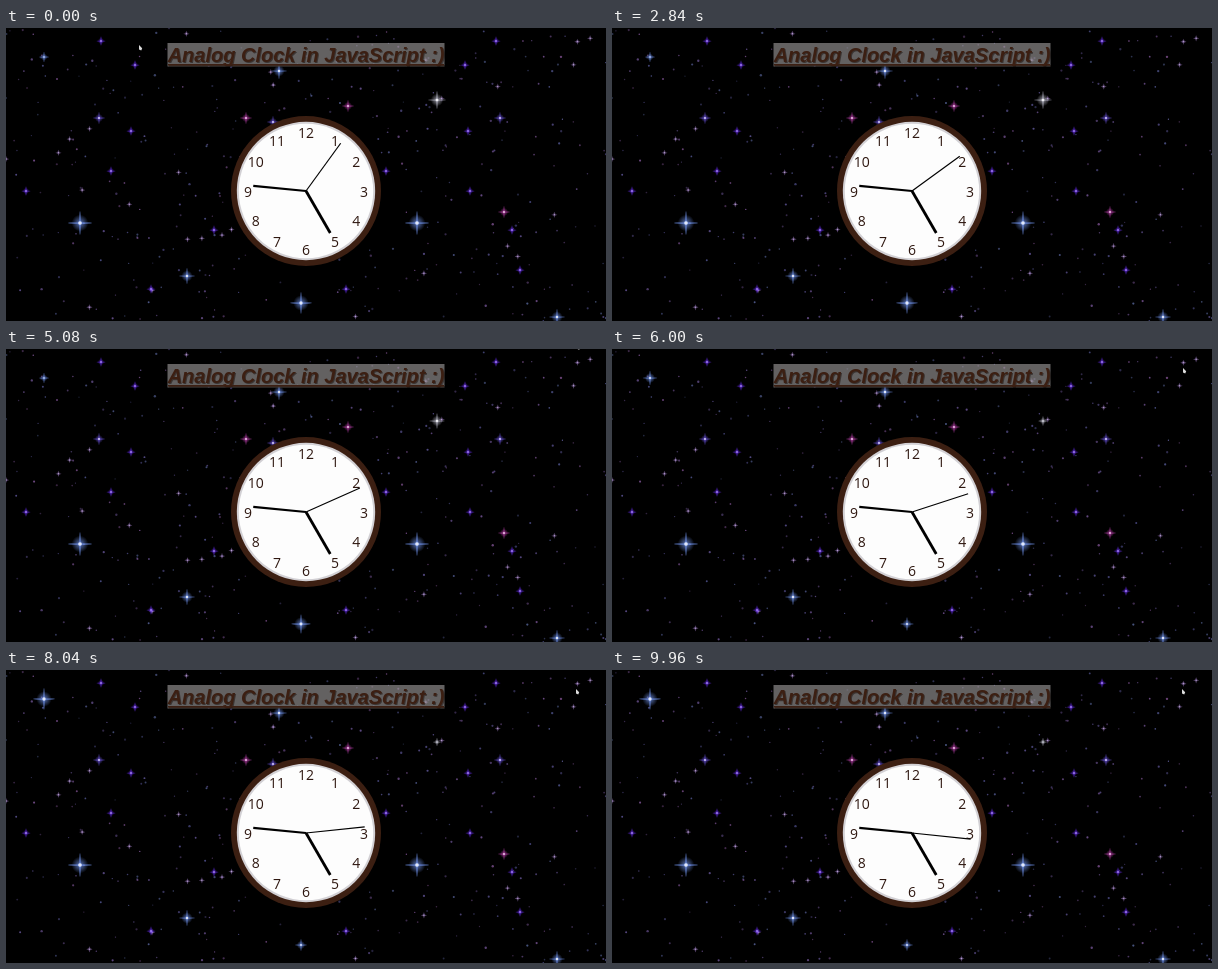
These frames come from a looping animation (600x293 px, 10 s). An HTML page with a canvas:

```html
<!DOCTYPE html>
<html lang="en">
<head>
<meta charset="utf-8">
<title>Analog Clock</title>
<style>
  html, body { margin: 0; height: 100%; overflow: hidden; background: #000; }
  canvas { display: block; }
</style>
</head>
<body>
<canvas width="600" height="293"></canvas>
<script>
const ctx = document.querySelector('canvas').getContext('2d');
const W = 600, H = 293, CX = 300, CY = 163, LOOP = 10000, TAU = Math.PI * 2;
const BROWN = '#3c1f12', BLUE = '115,150,240', VIOLET = '110,50,250', PINK = '190,65,175';

function dot(c, x, y, r, color) {
  c.fillStyle = color;
  c.beginPath();
  c.arc(x, y, r, 0, TAU);
  c.fill();
}

// A soft glow, four thin rays and a pale core
function star(c, x, y, r, rgb) {
  const glow = c.createRadialGradient(x, y, 0, x, y, r * .7);
  glow.addColorStop(0, `rgba(${rgb},1)`);
  glow.addColorStop(.35, `rgba(${rgb},.5)`);
  glow.addColorStop(1, `rgba(${rgb},0)`);
  dot(c, x, y, r * .7, glow);
  const ray = .4 + r * .05;
  c.fillStyle = `rgba(${rgb},.55)`;
  c.beginPath();
  c.ellipse(x, y, r, ray, 0, 0, TAU);
  c.ellipse(x, y, ray, r, 0, 0, TAU);
  c.fill();
  dot(c, x, y, r * .15, 'rgba(255,255,255,.8)');
}

function makeSky() {
  const sky = document.createElement('canvas');
  sky.width = W;
  sky.height = H;
  const c = sky.getContext('2d');
  let seed = 11;
  const rnd = () => (seed = seed * 16807 % 2147483647) / 2147483647;
  c.fillStyle = '#000';
  c.fillRect(0, 0, W, H);

  // Scattered dust, bluish to purple, with a small star now and then
  for (let i = 0; i < 420; i++) {
    const x = rnd() * W, y = rnd() * H, hue = 225 + rnd() * 60;
    dot(c, x, y, .6 + rnd() * .6, `hsla(${hue},28%,50%,${.35 + rnd() * .45})`);
    if (i % 16 === 0) star(c, x, y, 3, '135,105,165');
  }

  const scatter = (rgb, r, ...spots) => spots.forEach(([x, y]) => star(c, x, y, r, rgb));
  scatter(BLUE, 12, [74, 195], [411, 195]);
  scatter(BLUE, 8, [273, 43], [181, 248], [551, 289]);
  scatter('110,85,225', 6, [93, 90], [494, 90], [267, 94]);
  scatter(PINK, 6, [240, 90], [342, 78], [498, 184]);
  scatter(VIOLET, 4.5, [95, 13], [490, 13], [129, 37], [459, 37], [125, 103], [462, 103],
    [105, 143], [380, 143], [20, 163], [464, 163], [208, 202], [506, 202], [145, 261], [340, 261], [514, 242]);
  return sky;
}

const sky = makeSky();

function title() {
  ctx.fillStyle = 'rgba(150,147,147,.66)';
  ctx.fillRect(161.5, 15, 277, 23.5);
  ctx.font = 'italic bold 20px "Liberation Sans", Arial, sans-serif';
  ctx.textAlign = 'center';
  ctx.textBaseline = 'alphabetic';
  const write = (color, d) => {
    ctx.fillStyle = color;
    ctx.fillText('Analog Clock in JavaScript :)', CX + d, 34 + d);
    ctx.fillRect(162 + d, 36 + d, 276, 1.6);
  };
  write('rgba(20,10,5,.5)', 1);
  write(BROWN, 0);
}

function face() {
  dot(ctx, CX, CY, 75, BROWN);
  dot(ctx, CX, CY, 69.2, '#d2d0d4');
  dot(ctx, CX, CY, 67.2, '#fdfdfd');
  ctx.fillStyle = '#2e1710';
  ctx.font = '500 14px "Open Sans", sans-serif';
  ctx.textAlign = 'center';
  for (let n = 1; n <= 12; n++) {
    const a = n * TAU / 12;
    ctx.fillText(n, CX + 58 * Math.sin(a), CY + 5.6 - 58.5 * Math.cos(a));
  }
}

function hand(degrees, length, width) {
  const a = degrees * TAU / 360;
  ctx.strokeStyle = '#000';
  ctx.lineWidth = width;
  ctx.beginPath();
  ctx.moveTo(CX, CY);
  ctx.lineTo(CX + length * Math.sin(a), CY - length * Math.cos(a));
  ctx.stroke();
}

function pointer(x, y) {
  ctx.fillStyle = '#ddd';
  ctx.beginPath();
  ctx.moveTo(x, y);
  ctx.lineTo(x, y + 4.5);
  ctx.lineTo(x + 2.2, y + 5.5);
  ctx.lineTo(x + 3.2, y + 3.2);
  ctx.fill();
}

function ramp(t, from, to) {
  const p = Math.min(1, Math.max(0, (t - from) / (to - from)));
  return p * p * (3 - 2 * p);
}

function draw(t) {
  const fade = ramp(t, 4400, 6500);
  ctx.drawImage(sky, 0, 0);
  star(ctx, 38, 29, 5 + 6 * ramp(t, 5200, 7100), BLUE);
  star(ctx, 295, 275, 11 - 5 * fade, BLUE);
  star(ctx, 431, 72, 9 - 5 * fade, '190,190,205');
  title();
  face();
  hand(150, 48.5, 2.8);
  hand(275.5, 53, 2.2);
  hand(6 * (6 + Math.floor((t + 600) / 1000)), 59, 1.2);
  if (t < 600) pointer(133, 17 - 25 * ramp(t, 150, 600));
  if (t > 5000) pointer(571 - ramp(t, 6100, 7000), 19 - 25 * (1 - ramp(t, 5000, 5600)));
}

function tick() {
  draw(performance.now() % LOOP);
  requestAnimationFrame(tick);
}
tick();
</script>
</body>
</html>
```
